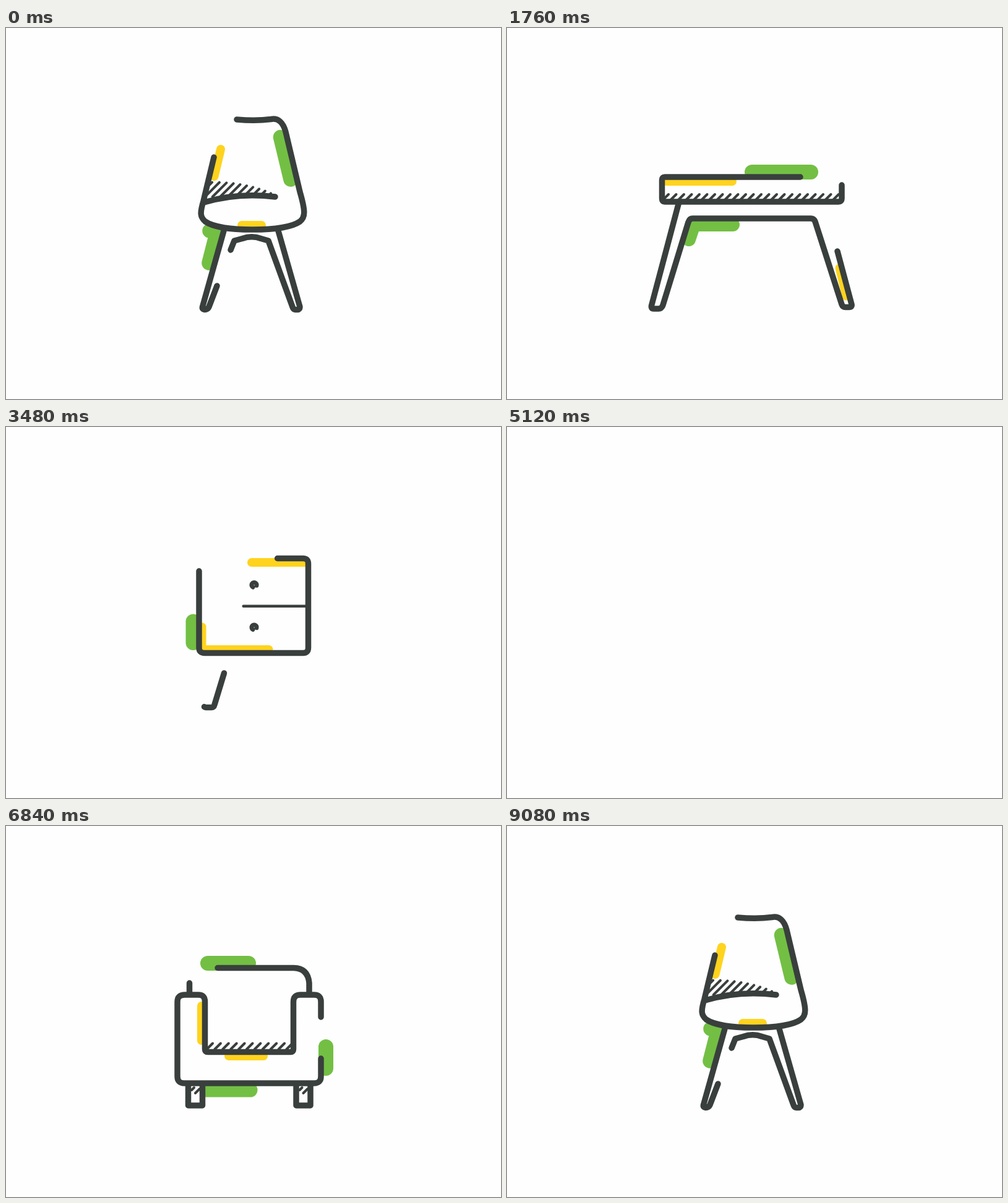
Recreate the animation shown at these times as an HTML page. Size 800 px wide and 600 px high, loop 9.4 s.

```html
<!DOCTYPE html>
<html lang="en">
<head>
<meta charset="utf-8">
<title>Furniture</title>
<style>
html, body { margin: 0; width: 100%; height: 100%; overflow: hidden; background: #fefefe; }
svg { display: block; width: 100%; height: 100%; fill: none; stroke-linecap: round; stroke-linejoin: round; }
</style>
</head>
<body>
<svg id="stage" viewBox="0 0 800 600"></svg>
<script>
const DARK = '#393f3d', GREEN = '#73bf44', YELLOW = '#ffd31e';
const LOOP = 9400, STEP = 40;
const stage = document.getElementById('stage');

// A stroke: path, start and end of drawing (ms into its scene), colour, width
const line = (d, from, to, width = 9.5) => ({ d, from, to, color: DARK, width });
const green = (d, from, to, width = 23.5) => ({ d, from, to, color: GREEN, width });
const yellow = (d, from, to, width = 14) => ({ d, from, to, color: YELLOW, width });
const slash = (x, y, size, from, to, width = 4) =>
  line(`M${x - size},${y + size}L${x},${y}`, from, to, width);
const hatch = (count, make) => Array.from({ length: count }, (_, i) => make(i));
const knob = y => line(`M399,${y + 3.5}A4,4 0 1 1 403,${y - 3.5}A4,4 0 0 1 399,${y + 3.5}`, 300, 900, 7);

const chair = [
  green('M460,245L443.5,176.5', 400, 1200),
  green('M328,380L341,329L329,328', 300, 920),
  yellow('M336.5,240L347,196', 300, 800),
  yellow('M381,319H413', 300, 800),
  ...hatch(10, i => {
    const x = 333 + 12 * i - 0.16 * i * i, y = 249.5 + 0.22 * i * i;
    return slash(x, y, Math.min(273 - y, x - 325), 800, 1720);
  }),
  line('M320,282Q375,265.5 435,273', 300, 1000),
  line('M352,328L317.5,451Q316.5,455 321,455.5Q326,455.5 328,451L341,417', 200, 800),
  line('M440,328L475,451Q475,455.5 471,455.5H468Q464,455 463,451L424,344L412,340.5Q397,335 382,340.5L369,344L363,359', 300, 1260),
  line('M336,209L319,280C313,300 314,306 322,313C335,322 365,326 398,326C432,326 462,322 475,313' +
    'C484,306 484,296 475,265L452,168C448,153 440,145 428,147.5C410,150 390,149.5 373,148', 0, 940)
];

const table = [
  green('M491,233H396', 900, 1600, 24),
  green('M294,342L302,318H365', 700, 1400, 22),
  yellow('M258,248H364', 800, 1400),
  yellow('M548,434L537,388', 1100, 1720, 13),
  ...hatch(23, i => slash(261 + 12.5 * i, 269, 9, 800, 1720)),
  line('M474,241H255Q250.5,241 250.5,246V276Q250.5,281 255,281H536Q541,281 541,276V254', 0, 750),
  line('M277,285L233.5,449Q232.5,454 237,454H245Q250,454 252,448L293,314Q295,308 300,308H491' +
    'Q496,308 498,313L541,447Q542.5,451.5 547,451.5H553Q558,451.5 557,447L534,361', 100, 1500)
];

const nightstand = [
  green('M302.5,349V294', 300, 950, 24),
  yellow('M317,323V359.5H425', 200, 680, 13),
  yellow('M484,219H397', 250, 680),
  ...[[354, 376, 7], [354, 387, 10], [452, 376, 5], [460, 383, 11]].map(s => slash(...s, 1940, 2000)),
  line('M488,289.7H338', 300, 900, 4.5),
  knob(255.5),
  knob(324),
  line('M352.5,398L337,449Q336,453.5 332,453.5H323Q319,453.5 320,449L344,368', 400, 1000),
  line('M442,368L464,449Q465,453.5 469,453.5H478Q482,453.5 481,449L457,368', 700, 1840),
  line('M312,233V357Q312,365.5 321,365.5H480Q488.5,365.5 488.5,357V221Q488.5,212.5 480,212.5H350', 0, 900)
];

const armchair = [
  green('M392,222H326', 800, 1500, 24),
  green('M517,392V357', 1100, 1700, 24),
  green('M325,427H395', 800, 1500, 23),
  yellow('M316,347V291', 700, 1300),
  yellow('M360,372H416', 700, 1300),
  ...hatch(11, i => slash(334 + 12.9 * i, 351.5, 9.5, 1000, 1720)),
  ...[0, 174.5].flatMap(dx => [
    slash(304 + dx, 423, 4, 1400, 1720),
    slash(313 + dx, 425, 7, 1400, 1720),
    line(`M${294.5 + dx},420V452H${317.5 + dx}V420`, 700, 1400)
  ]),
  line('M296.5,272V254', 900, 1300),
  line('M490,272V254Q488,230 465,229.5H342', 500, 1300),
  line('M509,309V284Q509,273 498,273H476Q464.5,273 464.5,284V361Q464.5,365.5 460,365.5H326' +
    'Q321.5,365.5 321.5,361V284Q321.5,273 311,273H289Q277,273 277,284V405Q277,416 288,416H498' +
    'Q509,416 509,405V376', 120, 1050)
];

function add(parent, name, attrs = {}) {
  const el = document.createElementNS('http://www.w3.org/2000/svg', name);
  for (const key in attrs) el.setAttribute(key, attrs[key]);
  return parent.appendChild(el);
}

const scenes = [[40, table], [2800, nightstand], [5120, armchair], [7360, chair]].map(([start, strokes]) => {
  const group = add(stage, 'g');
  for (const s of strokes)
    s.el = add(group, 'path', { d: s.d, stroke: s.color, 'stroke-width': s.width, pathLength: 1 });
  return { start, strokes, group };
});

const clamp = v => Math.min(1, Math.max(0, v));
const ease = v => v * v * (3 - 2 * v);

function draw(now) {
  const t = Math.floor(now % LOOP / STEP) * STEP;
  const active = scenes.filter(s => s.start <= t).pop() || scenes[3];
  const local = (t - active.start + LOOP) % LOOP;
  for (const s of scenes) s.group.style.display = s === active ? '' : 'none';
  for (const { el, from, to } of active.strokes) {
    const p = ease(clamp((local - from) / (to - from)));
    el.style.display = p > 0 ? '' : 'none';
    el.setAttribute('stroke-dasharray', p < 1 ? `${p} 2` : 'none');
  }
}

const begin = performance.now();
function tick() {
  draw(performance.now() - begin);
  requestAnimationFrame(tick);
}
tick();
</script>
</body>
</html>
```
